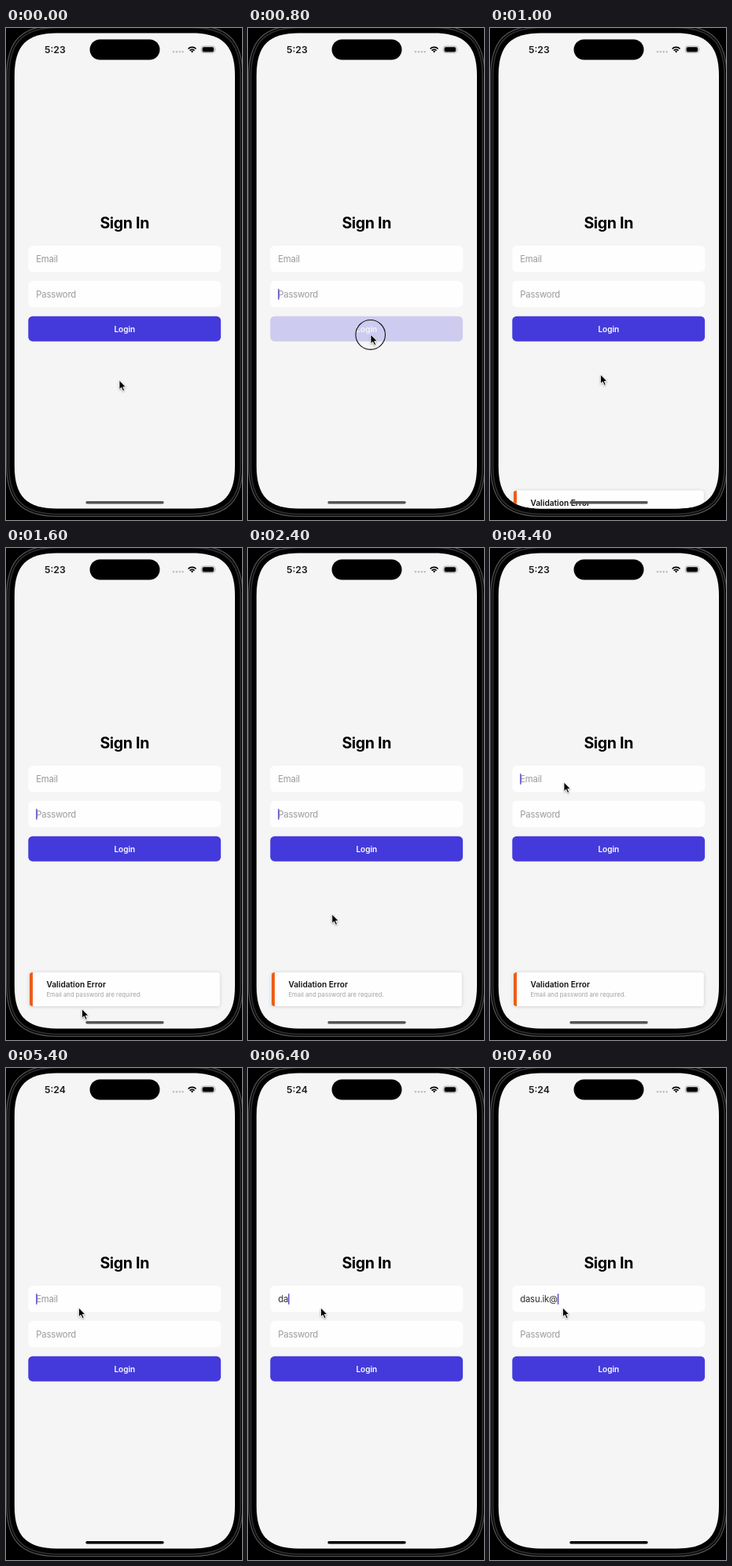
An HTML page that plays this animation: 300 by 626 pixels, repeating every 8000 ms.

```html
<!DOCTYPE html>
<html lang="en">
<head>
<meta charset="utf-8">
<title>Sign In</title>
<style>
  html, body { margin: 0; width: 100%; height: 100%; overflow: hidden; background: #000; }
  svg { display: block; width: 100%; height: 100%; }
  text { font-family: Inter, Roboto, sans-serif; }
  .field { fill: #fefefe; }
  .hint, .typed { font-size: 11.3px; letter-spacing: -.17px; fill: #999; }
  .typed { fill: #2c2c2c; }
</style>
</head>
<body>
<svg viewBox="0 0 300 626">
  <defs>
    <clipPath id="display"><path class="screen"/></clipPath>
    <clipPath id="card"><rect x="29.8" y="540" width="242" height="43" rx="4"/></clipPath>
    <filter id="soft" x="-10%" y="-30%" width="120%" height="160%">
      <feDropShadow dx="0" dy=".5" stdDeviation="2.2" flood-opacity=".18"/>
    </filter>
    <filter id="lift" x="-50%" y="-50%" width="200%" height="200%">
      <feDropShadow dx="0" dy="1" stdDeviation=".8" flood-opacity=".35"/>
    </filter>
  </defs>

  <rect width="300" height="626" fill="#000"/>
  <path class="rim" fill="none" stroke="#505050" stroke-width="1.3"/>
  <path class="band" fill="none" stroke="#2c2c2c" stroke-width="1.8"/>
  <path class="screen" fill="#f5f5f5"/>

  <rect x="106.5" y="14.5" width="89" height="26" rx="13" fill="#000"/>
  <text id="clock" x="49" y="31.6" font-size="12.2" font-weight="600" fill="#1c1c1c">5:23</text>
  <path d="M213 30.2H225" stroke="#bdbdbd" stroke-width="2.5" stroke-linecap="round" stroke-dasharray="0 3.87"/>
  <g fill="none" stroke="#000" stroke-width="1.7">
    <path d="M231.6 26.5A7 7 0 0 1 241.6 26.5M233.6 28.6A4.2 4.2 0 0 1 239.6 28.6"/>
    <path d="M235 29.8A2.2 2.2 0 0 1 238.2 29.8L236.6 31.4Z" fill="#000" stroke="none"/>
  </g>
  <rect x="248.3" y="23" width="17.2" height="8.6" rx="2.8" fill="none" stroke="#a5a5a5" stroke-width=".8"/>
  <rect x="249.6" y="24.2" width="14.6" height="6.2" rx="1.7" fill="#000"/>
  <path d="M266.5 25.9q1.1 1.4 0 2.8z" fill="#a5a5a5"/>

  <text x="150.7" y="255" font-size="19.6" font-weight="700" letter-spacing="-.35" text-anchor="middle">Sign In</text>
  <rect class="field" x="28.3" y="277" width="245" height="33.5" rx="6"/>
  <rect class="field" x="28.3" y="321.7" width="245" height="33.5" rx="6"/>
  <text id="hint" class="hint" x="38.2" y="298">Email</text>
  <text id="email" class="typed" x="38.2" y="298"></text>
  <text class="hint" x="38.2" y="342.8">Password</text>
  <rect id="caret" width="1.4" height="14" rx=".7" fill="#5146c4"/>
  <g id="button">
    <rect x="28.3" y="366.7" width="244.8" height="32" rx="5.5" fill="#443adc"/>
    <text x="150.8" y="386.5" font-size="10" font-weight="600" fill="#fff" text-anchor="middle">Login</text>
  </g>

  <g clip-path="url(#display)">
    <g id="toast">
      <rect x="29.8" y="540" width="242" height="43" rx="4" fill="#fefefe" filter="url(#soft)"/>
      <rect x="29.8" y="540" width="4.2" height="43" fill="#ee5d16" clip-path="url(#card)"/>
      <text x="51.5" y="559.4" font-size="10.15" font-weight="600" fill="#111">Validation Error</text>
      <text x="51.5" y="571" font-size="7.7" fill="#a2a2a2">Email and password are required.</text>
    </g>
  </g>
  <rect id="home" x="101.3" y="602" width="99.4" height="3.4" rx="1.7"/>

  <circle id="tap" r="18.8" fill="none" stroke="#111" stroke-width="1.1"/>
  <path id="pointer" filter="url(#lift)" stroke="#fff" stroke-width=".8"
        d="M0 0V11.6L2.7 9.2L4.7 13.6L6.6 12.7L4.7 8.5H8.3Z"/>
</svg>
<script>
  const LOOP = 8000, STEP = 200;
  const TAP_LOGIN = 800, TAP_EMAIL = 3200, TYPING = 6200;
  const TOAST_IN = 800, TOAST_OUT = 4800, NEXT_MINUTE = 5200, HIDDEN = 75;
  const ADDRESS = 'dasu.ik@';

  const $ = id => document.getElementById(id);
  const [clock, hint, email, caret, button, toast, home, tap, pointer] =
    ['clock', 'hint', 'email', 'caret', 'button', 'toast', 'home', 'tap', 'pointer'].map($);

  const ramp = (t, from, span) => Math.min(1, Math.max(0, (t - from) / span));
  const ease = p => p * p * (3 - 2 * p);
  const show = (el, on) => el.setAttribute('visibility', on ? 'visible' : 'hidden');
  const move = (el, x, y) => el.setAttribute('transform', `translate(${x} ${y})`);

  // Rounded rectangle with smooth corners, grown outward from the screen edge.
  function shell(grow) {
    const l = 10.8 - grow, t = 6.6 - grow, r = 291 + grow, b = 611.4 + grow;
    const c = 54 + grow * 1.2, k = c * .29;
    return `M${l + c} ${t}H${r - c}C${r - k} ${t} ${r} ${t + k} ${r} ${t + c}
      V${b - c}C${r} ${b - k} ${r - k} ${b} ${r - c} ${b}
      H${l + c}C${l + k} ${b} ${l} ${b - k} ${l} ${b - c}
      V${t + c}C${l} ${t + k} ${l + k} ${t} ${l + c} ${t}Z`;
  }
  const outline = (name, grow) => document.querySelectorAll('.' + name)
    .forEach(el => el.setAttribute('d', shell(grow)));
  outline('screen', 0);
  outline('band', 7.2);
  outline('rim', 10);

  // Each pointer trip starts where the last one ended.
  const rest = { x: 144, y: 448.3 };
  const trips = [
    { from: 0, span: 600, x: 156, y: 390 },
    { from: 800, span: 600, x: 96.5, y: 586.5 },
    { from: 1600, span: 800, x: 106.8, y: 466 },
    { from: 2600, span: 600, x: 127, y: 306 },
    { from: 3800, span: 400, x: 94, y: 298 },
    { from: 4800, span: 400, x: 92.5, y: 305 }
  ];
  const pointerAt = t => trips.reduce((at, trip) => {
    const p = ease(ramp(t, trip.from, trip.span));
    return { x: at.x + (trip.x - at.x) * p, y: at.y + (trip.y - at.y) * p };
  }, rest);

  // Two bursts of typing with a pause at the dot.
  function typedCount(t) {
    const half = ADDRESS.length / 2;
    return Math.floor(half * ramp(t, 6000, 800)) + Math.floor(half * ramp(t, 7000, 600));
  }

  function render(t) {
    const late = t >= NEXT_MINUTE;
    clock.textContent = late ? '5:24' : '5:23';
    home.setAttribute('fill', late ? '#000' : '#555');

    const count = typedCount(t);
    email.textContent = ADDRESS.slice(0, count);
    show(hint, !count);

    const width = count ? email.getComputedTextLength() : 0;
    move(caret, 38.2 + width, t < TAP_EMAIL ? 331.8 : 287);
    show(caret, t >= TYPING || t % 1000 >= 400);

    const held = start => t >= start && t < start + STEP;
    button.setAttribute('opacity', held(TAP_LOGIN) ? .22 : 1);

    const shown = ease(ramp(t, TOAST_IN, 500)) - ease(ramp(t, TOAST_OUT, 400));
    move(toast, 0, HIDDEN * (1 - shown));
    show(toast, shown > 0);

    const { x, y } = pointerAt(t);
    move(pointer, x, y);
    move(tap, x - .3, y + .3);
    show(tap, held(TAP_LOGIN) || held(TAP_EMAIL));
  }

  // The picture advances in even steps.
  const start = performance.now();
  function tick() {
    render(Math.floor((performance.now() - start) % LOOP / STEP) * STEP);
    requestAnimationFrame(tick);
  }
  tick();
</script>
</body>
</html>
```
